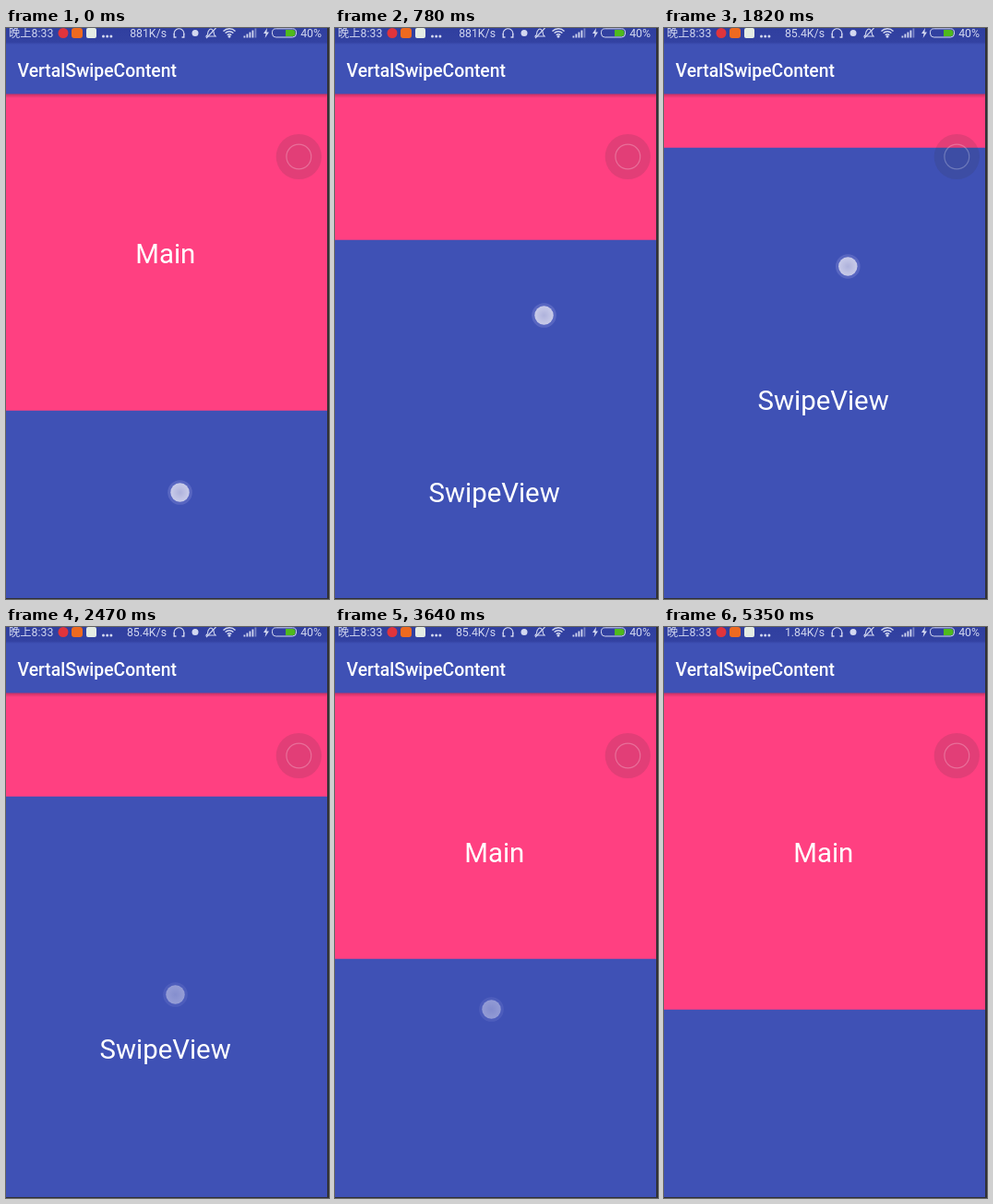
Animation of 350 by 619 pixels, one loop 5740 ms. Source, as an HTML page with a canvas:

```html
<!DOCTYPE html>
<html lang="en">
<head>
<meta charset="utf-8">
<title>Swipe panel</title>
<style>
html, body { margin: 0; width: 100%; height: 100%; overflow: hidden; background: #303034; }
canvas { display: block; width: 350px; height: 619px; }
</style>
</head>
<body>
<canvas id="stage"></canvas>
<script>
const W = 350, H = 619, LOOP = 5740, STEP = 130;
const TOP = 72, REST = 414, SETTLE = 600, FADE = 160;
const BLUE = '#3f51b5', PINK = '#ff4081', INK = '#d3d8f0';
const SMALL = '12.3px Roboto, "Noto Sans CJK SC", "Noto Sans CJK", sans-serif';
const LARGE = '29.4px Roboto, sans-serif';

const smooth = u => u * u * (3 - 2 * u);
const glide = u => 1 - (1 - u) ** 1.8;
const mix = (a, b, k) => a + (b - a) * k;

// The finger moves over `span`, lets go at `end`; the panel edge stays `grab` above it, then settles
const drags = [
  { start: 0, span: 700, end: 918, from: [188, 503], to: [226, 311], grab: 82, goal: TOP, ease: smooth },
  { start: 1684, span: 721, end: 2405, from: [206, 194], to: [183, 398], grab: 129, goal: TOP, ease: glide },
  { start: 2970, span: 602, end: 3572, from: [188, 172], to: [169, 414], grab: 100, goal: REST, ease: glide }
];

const canvas = document.getElementById('stage');
const ctx = canvas.getContext('2d');
const dpr = window.devicePixelRatio || 1;
canvas.width = Math.round(W * dpr);
canvas.height = Math.round(H * dpr);

function pose(t) {
  const { start, span, end, from, to, grab, goal, ease } = drags.filter(d => d.start <= t).pop();
  const k = ease(Math.min(1, (t - start) / span));
  const x = mix(from[0], to[0], k), y = mix(from[1], to[1], k);
  const since = Math.max(0, t - end);
  const held = Math.min(REST, Math.max(TOP, y - grab));
  const left = Math.max(0, 1 - since / SETTLE);
  return {
    x: x + 0.5, y: y + 0.5,
    edge: Math.round(mix(goal, held, left ** 5)),
    alpha: Math.max(0, 1 - since / FADE)
  };
}

function rect(x, y, w, h, color) {
  ctx.fillStyle = color;
  ctx.fillRect(x, y, w, h);
}

function disc(x, y, r, color) {
  ctx.fillStyle = color;
  ctx.beginPath();
  ctx.arc(x, y, r, 0, Math.PI * 2);
  ctx.fill();
}

function box(x, y, w, h, r, color) {
  ctx.fillStyle = color;
  ctx.beginPath();
  ctx.roundRect(x, y, w, h, r);
  ctx.fill();
}

function text(str, x, y, font, align = 'left', color = '#fff') {
  ctx.font = font;
  ctx.textAlign = align;
  ctx.fillStyle = color;
  ctx.fillText(str, x, y);
}

function draft(path, width = 1.1, color = INK) {
  ctx.strokeStyle = color;
  ctx.lineWidth = width;
  ctx.stroke(new Path2D(path));
}

function arc(x, y, r, from, to, width = 1.1, color = INK) {
  ctx.strokeStyle = color;
  ctx.lineWidth = width;
  ctx.beginPath();
  ctx.arc(x, y, r, from * Math.PI, to * Math.PI);
  ctx.stroke();
}

function speed(t) {
  if (t < 1040) return '881K/s';
  if (t < 4160) return '85.4K/s';
  return t < 4970 ? '2.14K/s' : '1.84K/s';
}

function headphones(x) {
  arc(x, 6, 5.3, 0.95, 2.05);
  for (const side of [-1, 1]) draft(`M${x + side * 5.3} 6 V10 H${x + side * 3}`, 1.4);
}

function mutedBell(x) {
  draft(`M${x - 5} 9 Q${x - 3} 7 ${x - 3} 4 Q${x} -2 ${x + 3} 4 Q${x + 3} 7 ${x + 5} 9 Z`);
  draft(`M${x - 5} 11 L${x + 5.5} 0`);
}

function wifi(x) {
  for (let r = 3.2; r < 10; r += 3) arc(x, 10, r, 1.25, 1.75, 1.4);
  disc(x, 9.3, 1.4, INK);
}

function signal(x) {
  for (let i = 0; i < 5; i++) {
    const h = 2 + i * 2;
    rect(x + i * 3, 10.5 - h, 1.8, h, i < 4 ? INK : '#7c87c6');
  }
}

function battery(x) {
  ctx.fillStyle = INK;
  ctx.fill(new Path2D(`M${x - 5} 0 l-4 6 h2.6 l-1 5 l4.4 -6.5 h-2.6 Z`));
  box(x + 15, 2, 10.5, 7, [0, 3, 3, 0], '#4fb91c');
  ctx.strokeStyle = INK;
  ctx.lineWidth = 1;
  ctx.beginPath();
  ctx.roundRect(x + 0.5, 0.8, 26, 9.2, 4);
  ctx.stroke();
}

function statusBar(t) {
  const shade = ctx.createLinearGradient(0, 0, 0, 18);
  shade.addColorStop(0, '#303f9f');
  shade.addColorStop(0.85, '#3342a2');
  shade.addColorStop(1, BLUE);
  rect(0, 0, 348, 18, shade);

  text('晚上8:33', 3, 10, SMALL, 'left', INK);
  disc(62, 5.5, 5.5, '#e0343c');
  box(71, 0, 12, 11, 3, '#ee6a20');
  box(87, 0, 11, 11, 2, '#e4ece4');
  for (let i = 0; i < 3; i++) disc(105.5 + i * 4.2, 9, 1.5, INK);
  text(speed(t), 174, 10, SMALL, 'right', INK);
  headphones(187.5);
  disc(205, 5.5, 3.5, INK);
  mutedBell(222);
  wifi(242);
  signal(257.5);
  battery(288);
  text('40%', 342, 10, SMALL, 'right', INK);
}

function toolbar(t) {
  const shadow = ctx.createLinearGradient(0, TOP, 0, TOP + 4);
  shadow.addColorStop(0, 'rgba(0,0,0,.2)');
  shadow.addColorStop(1, 'rgba(0,0,0,0)');
  rect(0, TOP - 1, 348, 5, shadow);
  rect(0, 0, 348, TOP - 0.5, BLUE);
  text('VertalSwipeContent', 12.6, 52.5, '500 19.35px Roboto, sans-serif');
  statusBar(t);
}

function touch({ x, y, alpha }) {
  ctx.globalAlpha = alpha;
  disc(x, y, 13.3, 'rgba(190,190,245,.2)');
  const glow = ctx.createRadialGradient(x, y, 0, x, y, 10.2);
  glow.addColorStop(0, 'rgba(208,208,230,.72)');
  glow.addColorStop(1, 'rgba(226,226,242,.82)');
  disc(x, y, 10.2, glow);
  ctx.globalAlpha = 1;
}

function draw(t) {
  const now = pose(Math.floor(t / STEP) * STEP);
  ctx.setTransform(dpr, 0, 0, dpr, 0, 0);
  rect(0, 0, W, H, '#303034');

  ctx.save();
  ctx.beginPath();
  ctx.rect(0, 0, 348, 618);
  ctx.clip();

  rect(0, TOP - 1, 348, H, PINK);
  text('Main', 172.8, 255, LARGE, 'center');
  rect(0, now.edge + 0.75, 348, H, BLUE);
  text('SwipeView', 172.6, now.edge + 285, LARGE, 'center');
  toolbar(t);

  disc(317.3, 139.5, 24.6, 'rgba(50,50,60,.14)');
  arc(317.3, 139.5, 13.4, 0, 2, 1.2, 'rgba(255,255,255,.25)');
  touch(now);
  ctx.restore();
}

let start;
function tick(time) {
  if (start === undefined) start = time;
  draw(Math.max(0, time - start) % LOOP);
  requestAnimationFrame(tick);
}
draw(0);
requestAnimationFrame(tick);
</script>
</body>
</html>
```
